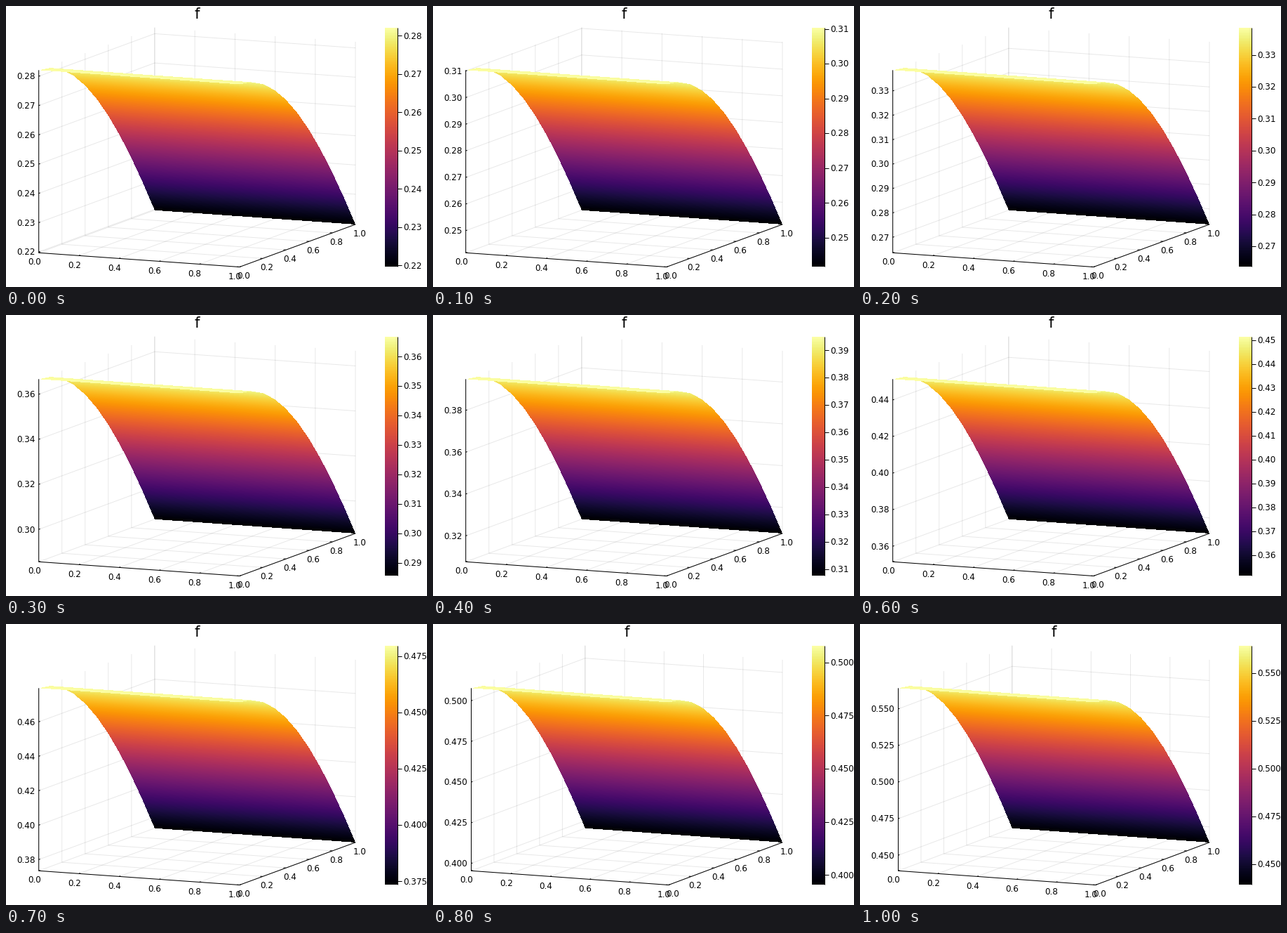
Recreate the animation shown at these times as a matplotlib script. Size 600 by 400 pixels, loop 1100 ms.

```python
import numpy as np
import matplotlib.pyplot as plt
from matplotlib.animation import FuncAnimation

W, H, DPI = 600, 400, 100
PX = 72 / DPI
FRAMES = 11
PEAK = 1 / np.sqrt(4 * np.pi)
LOW = np.exp(-0.25)
INFERNO = plt.get_cmap("inferno")
TICKS = np.linspace(0, 1, 6)

plt.rcParams["font.family"] = "DejaVu Sans"
fig = plt.figure(figsize=(W / DPI, H / DPI), dpi=DPI, facecolor="white")
ax = fig.add_axes([0, 0, 1, 1])


class View:
    """Parallel projection of the unit cube onto the stage."""

    def __init__(self, left):
        width = 498 - left
        self.origin = np.array([left, 351.3])
        self.ex = np.array([0.634 * width, 20.2])
        self.ey = np.array([0.366 * width, -60.6])
        self.ez = np.array([0, -260.0])

    def __call__(self, x, y, z):
        return self.origin + x * self.ex + y * self.ey + z * self.ez


def height(y):
    """Gaussian profile scaled to 0..1 over the unit interval."""
    return (np.exp(-y * y / 4) - LOW) / (1 - LOW)


def surface(view):
    """Hard-edged raster of the surface, painted from back to front."""
    img = np.zeros((H, W, 4))
    rows, cols = np.mgrid[0:H, 0:W] + 0.5
    knots = np.linspace(0, 1, 11)
    for near, far in zip(knots[-2::-1], knots[:0:-1]):
        z0, z1 = height(near), height(far)
        start = view(0, near, z0)
        (ax_, ay), (bx, by) = view.ex, view(0, far, z1) - start
        dx, dy = cols - start[0], rows - start[1]
        det = ax_ * by - ay * bx
        u = (dx * by - dy * bx) / det
        v = (ax_ * dy - ay * dx) / det
        inside = (u >= 0) & (u <= 1) & (v >= 0) & (v <= 1)
        img[inside] = INFERNO((z0 + v * (z1 - z0))[inside])
    return img


VIEWS = {left: View(left) for left in (46.7, 54.5)}
SURFACES = {left: surface(view) for left, view in VIEWS.items()}


def line(*points, color="black", alpha=1.0, width=1.0):
    xs, ys = zip(*points)
    ax.plot(xs, ys, color=color, alpha=alpha, lw=width * PX,
            solid_capstyle="butt", zorder=3 if alpha == 1 else 1)


def label(x, y, text, ha="center", size=12):
    ax.text(x, y + 0.365 * size, text, ha=ha, va="baseline",
            fontsize=size * PX, zorder=4)


def multiples(lo, hi, step):
    return step * np.arange(np.ceil(lo / step), np.floor(hi / step) + 1)


def number(value, step):
    return f"{value:.3f}" if step == 0.025 else f"{value:.2f}"


def draw_grid(view, levels):
    faint = dict(alpha=0.09)
    for t in TICKS:
        line(view(t, 0, 0), view(t, 1, 0), view(t, 1, 1), **faint)
        line(view(1, t, 0), view(0, t, 0), view(0, t, 1), **faint)
    for h in levels:
        line(view(0, 0, h), view(0, 1, h), view(1, 1, h), **faint)


def draw_axes(view, levels, names):
    line(view(0, 0, 1), view(0, 0, 0), view(1, 0, 0), view(1, 1, 0))
    for t in TICKS:
        x, y = view(t, 0, 0)
        line((x, y), view(t, 0.012, 0))
        label(x - 6.5, y + 12.8, f"{t:.1f}")
        x, y = view(1, t, 0)
        line((x, y), view(0.988, t, 0))
        label(x + 6, y + 12.5, f"{t:.1f}")
    for h, name in zip(levels, names):
        x, y = view(0, 0, h)
        line((x, y), view(0, 0.012, h))
        label(x - 5, y, name, ha="right")


def draw_colorbar(lo, hi):
    left, right, top, bottom = 540, 558, 31, 371
    ax.imshow(np.linspace(0, 1, 340)[:, None], cmap=INFERNO, origin="lower",
              extent=(left, right, bottom, top), aspect="auto",
              interpolation="nearest", zorder=2)
    line((right, top), (right, bottom))
    step = 0.01 if hi - lo < 0.1 else 0.025
    for value in multiples(lo, hi, step):
        y = bottom - (bottom - top) * (value - lo) / (hi - lo)
        line((right, y), (right + 6, y))
        label(right + 8.5, y, number(value, step), ha="left")


def draw(i):
    ax.clear()
    hi = PEAK * (1 + i / 10)
    lo = hi * LOW
    step = 0.01 if i < 3 else 0.02 if i < 8 else 0.025
    left = 54.5 if step == 0.025 else 46.7
    view = VIEWS[left]
    values = multiples(lo, hi, step)
    levels = (values - lo) / (hi - lo)

    draw_grid(view, levels)
    ax.imshow(SURFACES[left], extent=(0, W, H, 0), aspect="auto",
              interpolation="nearest", zorder=2)
    draw_axes(view, levels, [number(v, step) for v in values])
    draw_colorbar(lo, hi)
    label((left + 498) / 2, 10.8, "f", size=21)

    ax.set(xlim=(0, W), ylim=(H, 0))
    ax.axis("off")
    return ax.get_children()


anim = FuncAnimation(fig, draw, frames=FRAMES, interval=100,
                     repeat=True, repeat_delay=0, blit=False)
plt.show()
```
